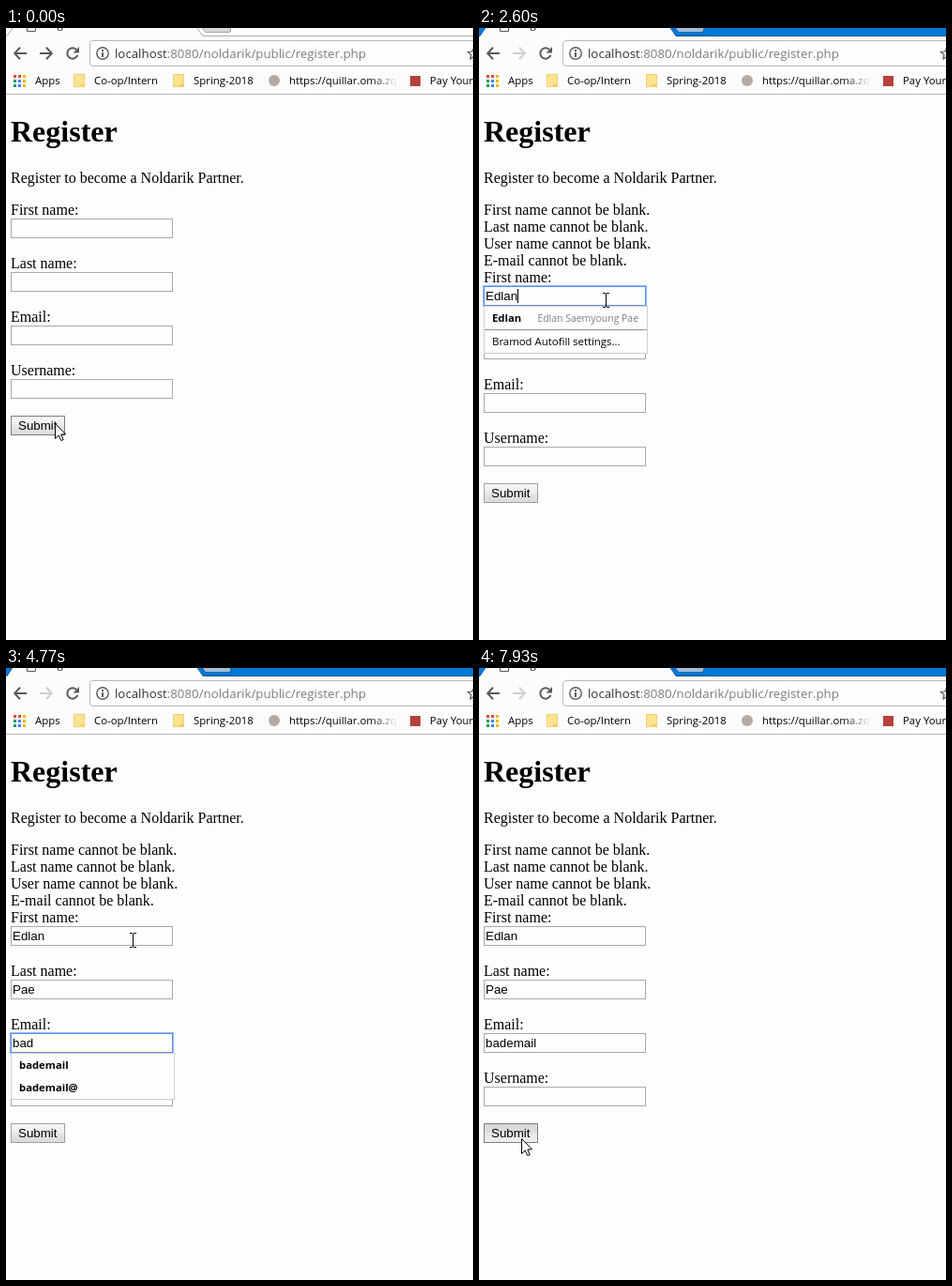
An HTML page with a canvas for the animation above (8000 ms loop, 498 by 652 pixels).

```html
<!DOCTYPE html>
<html lang="en">
<head>
<meta charset="utf-8">
<title>Register</title>
<style>
html, body { margin: 0; width: 498px; height: 652px; overflow: hidden; background: #fdfdfd; }
canvas { display: block; }
</style>
</head>
<body>
<canvas id="stage" width="498" height="652"></canvas>
<script>
const ctx = document.getElementById("stage").getContext("2d");
const LOOP = 8000;
const SERIF = "'Liberation Serif', serif";
const SANS = "'Liberation Sans', Arial, sans-serif";
const UI = "'Open Sans', 'Noto Sans', sans-serif";
const PAGE = "#fdfdfd", BAR = "#fcfcfc", BLUE = "#0078d7", ICON = "#5a5a5a";

const FIRST = "Edlan", LAST = "Pae", FULL = "Edlan Saemyoung Pae";
const MAIL = "bademail";
const LABELS = ["First name:", "Last name:", "Email:", "Username:"];
const ERRORS = ["First name", "Last name", "User name", "E-mail"];

// Each cue changes part of the state from its time on.
const START = {
  active: false, errors: false, button: "hover", focus: -1, caret: true,
  popup: false, typed: [0, 0, 0], beam: false, x: 52, y: 421
};
const CUES = [
  [120, { active: true, button: "down" }],
  [270, { button: "hover" }],
  [570, { errors: true, button: "idle" }],
  [940, { x: 78, y: 372 }],
  [1080, { x: 112, y: 318 }],
  [1220, { x: 131, y: 292, beam: true }],
  [1370, { x: 135, y: 290 }],
  [1520, { focus: 0 }],
  [1920, { typed: [1, 0, 0], popup: true }],
  [2200, { typed: [2, 0, 0] }],
  [2340, { typed: [3, 0, 0] }],
  [2470, { typed: [4, 0, 0] }],
  [2600, { typed: [5, 0, 0] }],
  [2740, { focus: 1, popup: false }],
  [3140, { typed: [5, 1, 0], popup: true }],
  [3390, { typed: [5, 3, 0] }],
  [3510, { focus: 2, popup: false }],
  [3880, { typed: [5, 3, 1], popup: true }],
  [4020, { typed: [5, 3, 2] }],
  [4150, { typed: [5, 3, 3] }],
  [4770, { caret: false }],
  [5050, { caret: true, typed: [5, 3, 4] }],
  [5190, { typed: [5, 3, 5] }],
  [5320, { typed: [5, 3, 7] }],
  [5460, { typed: [5, 3, 8] }],
  [5900, { caret: false }],
  [6320, { focus: 3, popup: false, caret: true }],
  [6470, { x: 134, y: 440 }],
  [6620, { x: 129, y: 471, beam: false }],
  [6740, { x: 115, y: 474 }],
  [7020, { caret: false }],
  [7170, { x: 104, y: 474 }],
  [7450, { caret: true }],
  [7570, { x: 78, y: 482 }],
  [7690, { x: 56, y: 495 }],
  [7810, { x: 45, y: 501 }],
  [7930, { focus: -1, button: "down" }]
];

function stateAt(t) {
  const s = { ...START };
  for (const [at, change] of CUES) if (at <= t) Object.assign(s, change);
  return s;
}

function text(str, x, y, font, color = "#000", align = "left") {
  ctx.font = font;
  ctx.fillStyle = color;
  ctx.textAlign = align;
  ctx.fillText(str, x, y);
}

function rect(x, y, w, h, color) {
  ctx.fillStyle = color;
  ctx.fillRect(x, y, w, h);
}

function frame(x, y, w, h, color) {
  ctx.strokeStyle = color;
  ctx.lineWidth = 1;
  ctx.strokeRect(x + 0.5, y + 0.5, w - 1, h - 1);
}

function line(points, color, width = 1) {
  ctx.beginPath();
  points.forEach(([x, y]) => ctx.lineTo(x, y));
  ctx.strokeStyle = color;
  ctx.lineWidth = width;
  ctx.stroke();
}

function shape(points, color) {
  ctx.beginPath();
  points.forEach(([x, y]) => ctx.lineTo(x, y));
  ctx.closePath();
  ctx.fillStyle = color;
  ctx.fill();
}

function disc(x, y, r, color) {
  ctx.beginPath();
  ctx.arc(x, y, r, 0, 7);
  ctx.fillStyle = color;
  ctx.fill();
}

function drawTabs(active) {
  const edge = "rgba(0,0,0,0.32)";
  const plus = [[209.5, 0], [211.5, 3], [213.5, 4.5], [237.5, 4.5], [239.5, 3.5], [239.5, 0]];
  rect(0, 0, 498, 9, active ? BLUE : "#fdfdfd");
  shape([[7, 0], [204, 0], [210, 9], [1, 9]], BAR);
  line([[0, 8.5], [1.5, 8], [7, 0]], edge);
  line([[204, 0], [209, 7.5], [211, 8.5], [498, 8.5]], edge);
  shape(plus, active ? "#9fbedd" : "#d9d9d9");
  line(plus, edge);
  line([[22.5, 0], [22.5, 3.5], [31.5, 3.5], [31.5, 0]], ICON);
  text("Register", 41, 0, "11.4px " + UI, "#222");
}

function arrow(x, dir, color) {
  line([[x - 7 * dir, 27], [x + 5.6 * dir, 27]], color, 2);
  line([[x, 20.7], [x + 5.8 * dir, 27], [x, 33.3]], color, 2);
}

function drawReload() {
  ctx.beginPath();
  ctx.arc(71, 27, 5.7, 0.35, 5.5);
  ctx.strokeStyle = ICON;
  ctx.lineWidth = 2;
  ctx.stroke();
  shape([[78, 20], [78, 26.5], [71.5, 26.5]], ICON);
}

function drawAddress() {
  ctx.beginPath();
  ctx.roundRect(89.5, 13.5, 430, 27, 3);
  ctx.fillStyle = "#fefefe";
  ctx.fill();
  ctx.strokeStyle = "#b9b9b9";
  ctx.lineWidth = 1;
  ctx.stroke();

  ctx.beginPath();
  ctx.arc(103, 27, 6.2, 0, 7);
  ctx.strokeStyle = ICON;
  ctx.lineWidth = 1.4;
  ctx.stroke();
  rect(102, 26, 2, 5, ICON);
  rect(102, 23, 2, 2, ICON);

  const font = "13.3px " + UI;
  text("localhost", 116, 32, font, "#333");
  const x = 116 + ctx.measureText("localhost").width;
  text(":8080/noldarik/public/register.php", x, 32, font, "#7d7d7d");
  line([[498, 31], [495, 33], [496, 28.5], [492.5, 25.5], [497, 25], [498, 22.5]], ICON, 1.2);
}

function drawFolder(x) {
  rect(x, 49, 12, 14, "#ffe38f");
  frame(x, 49, 12, 14, "#eccf74");
  rect(x + 7, 60, 5, 3, "#f3cf63");
}

function drawBookmarks() {
  const font = "11.4px " + UI;
  const red = "#dd4b39", gold = "#f4b400", green = "#0f9d58", blue = "#4285f4";
  [red, red, gold, green, blue, gold, green, blue, gold].forEach((c, i) =>
    rect(8 + (i % 3) * 5, 50 + Math.floor(i / 3) * 5, 3, 3, c));
  text("Apps", 31, 60, font);
  drawFolder(72);
  text("Co-op/Intern", 94, 60, font);
  drawFolder(178);
  text("Spring-2018", 200, 60, font);
  disc(286, 56, 6, "#b5a9a6");

  const fade = ctx.createLinearGradient(388, 0, 418, 0);
  fade.addColorStop(0, "#000");
  fade.addColorStop(1, "rgba(0,0,0,0)");
  ctx.save();
  ctx.beginPath();
  ctx.rect(300, 46, 117, 20);
  ctx.clip();
  text("https://quillar.oma.zq.e", 302, 60, font, fade);
  ctx.restore();

  rect(431, 51, 11, 11, "#b4413c");
  text("Pay Your", 452, 60, font);
}

function drawBrowser(s) {
  rect(0, 9, 498, 61, BAR);
  drawTabs(s.active);
  arrow(15, -1, ICON);
  arrow(43, 1, s.errors ? "#cfcfcf" : ICON);
  drawReload();
  drawAddress();
  drawBookmarks();
  rect(0, 70, 498, 1, "#b8b8b8");
}

function drawField(y, value, focused, caret) {
  rect(5, y, 173, 21, "#fefefe");
  if (focused) {
    frame(4, y - 1, 175, 23, "#8fb5f5");
    frame(5, y, 173, 21, "#5f92e8");
  } else {
    frame(5, y, 173, 21, "#a9a9a9");
  }
  text(value, 7, y + 15, "13.333px " + SANS);
  if (focused && caret) rect(7 + Math.floor(ctx.measureText(value).width), y + 3, 1, 15, "#000");
}

function drawButton(y, look) {
  const stops = look === "down" ? ["#d6d6d6", "#dedede", "#e6e6e6", "#efefef"]
                                : ["#f5f5f5", "#efefef", "#e6e6e6", "#dadada"];
  const fill = ctx.createLinearGradient(0, y, 0, y + 21);
  [0, 0.48, 0.5, 1].forEach((p, i) => fill.addColorStop(p, stops[i]));
  rect(5, y, 58, 21, fill);
  frame(5, y, 58, 21, look === "idle" ? "#a0a0a0" : "#7d7d7d");
  text("Submit", 13, y + 15, "13.333px " + SANS);
}

function drawPopup(y, field) {
  const bold = "bold 11.3px " + UI;
  const h = field === 2 ? 50 : 51;
  rect(5, y, 175, h, "#fefefe");
  frame(5, y, 175, h, "#cfcfcf");
  if (field === 2) {
    text(MAIL, 14, y + 17, bold);
    text(MAIL + "@", 14, y + 41, bold);
    return;
  }
  text(field ? LAST : FIRST, 14, y + 17, bold);
  text(FULL, 170, y + 17, "10.45px " + UI, "#808080", "right");
  rect(6, y + 25, 173, 1, "#8f8f8f");
  text("Bramod Autofill settings...", 14, y + 42, "11.4px " + UI);
}

function drawPage(s) {
  const body = "16px " + SERIF;
  text("Register", 5, 121, "bold 32px " + SERIF);
  text("Register to become a Noldarik Partner.", 5, 165, body);
  if (s.errors) ERRORS.forEach((e, i) => text(e + " cannot be blank.", 5, 199 + 18 * i, body));

  const top = s.errors ? 275 : 203;
  const values = [FIRST, LAST, MAIL].map((v, i) => v.slice(0, s.typed[i]));
  LABELS.forEach((label, i) => {
    text(label, 5, top - 4 + 57 * i, body);
    drawField(top + 57 * i, values[i] || "", s.focus === i, s.caret);
  });
  drawButton(top + 210, s.button);
  if (s.popup) drawPopup(top + 57 * s.focus + 21, s.focus);
}

function drawPointer({ x, y, beam }) {
  ctx.save();
  ctx.translate(x, y);
  if (beam) {
    rect(0, -7, 1, 14, "#000");
    for (const dy of [-8, 7]) {
      rect(-3, dy, 3, 1, "#000");
      rect(1, dy, 3, 1, "#000");
    }
  } else {
    const tip = [[0.5, 0.5], [0.5, 16.5], [4.2, 13], [6.8, 18.5], [9.2, 17.5], [6.8, 12], [11.5, 11.8], [0.5, 0.5]];
    shape(tip, "#fff");
    line(tip, "#000");
  }
  ctx.restore();
}

function draw(now) {
  const s = stateAt(now % LOOP);
  rect(0, 0, 498, 652, PAGE);
  drawBrowser(s);
  drawPage(s);
  drawPointer(s);
}

let begin = null;
function tick(now) {
  if (begin === null) begin = now;
  draw(now - begin);
  requestAnimationFrame(tick);
}
draw(0);
requestAnimationFrame(tick);
</script>
</body>
</html>
```
